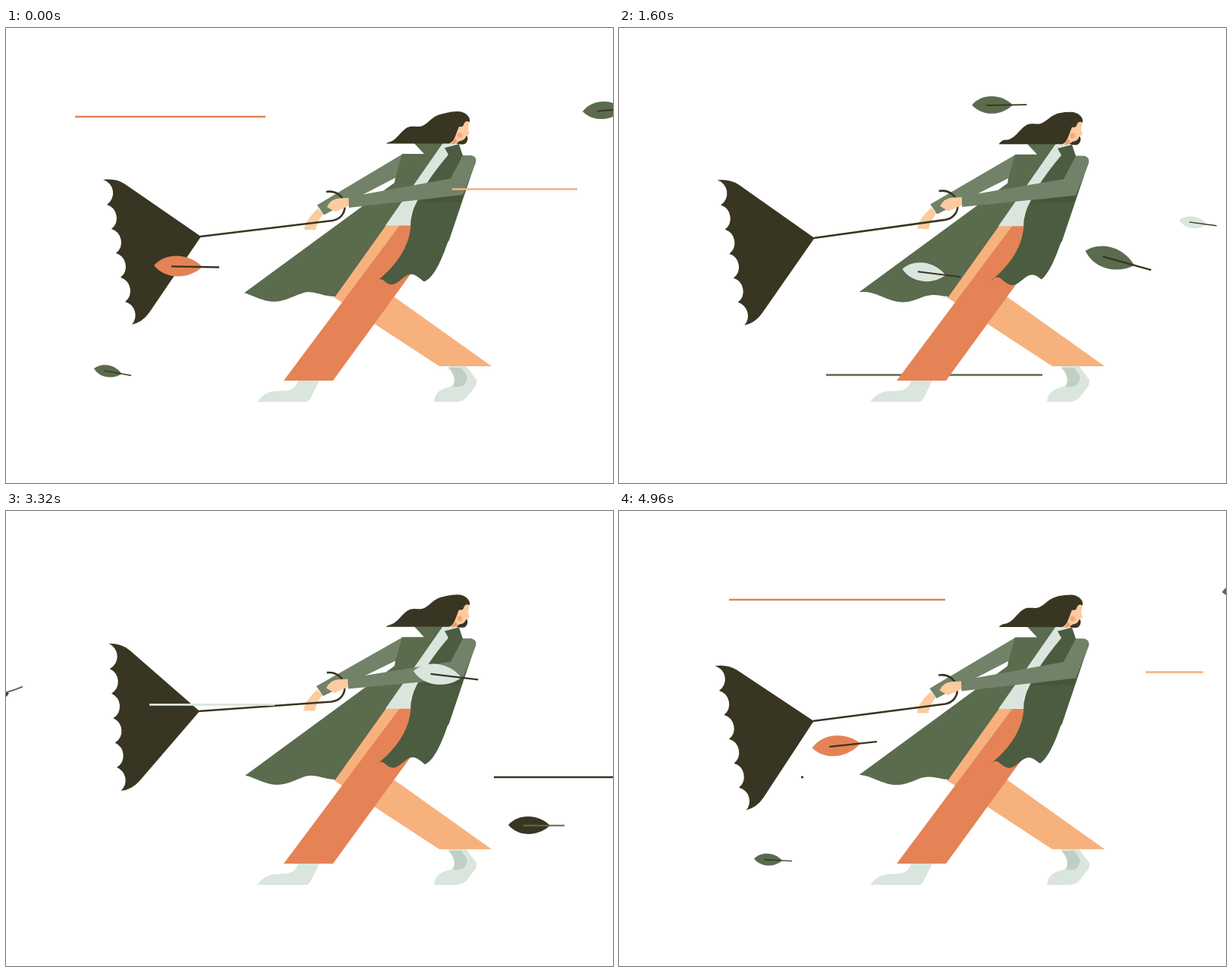
Animation, 800 px wide and 600 px high, one loop 5 s. Source, as an HTML page with a canvas:

```html
<!DOCTYPE html>
<html lang="en">
<head>
<meta charset="utf-8">
<title>Windy walk</title>
<style>
  html, body { margin: 0; width: 100%; height: 100%; overflow: hidden; background: #fff; }
  canvas { display: block; width: 800px; height: 600px; }
</style>
</head>
<body>
<canvas id="stage" width="800" height="600"></canvas>
<script>
const ctx = document.getElementById('stage').getContext('2d');
const LOOP = 5000, STEP = 40, TAU = Math.PI * 2;
const DARK = '#383622', GREEN = '#5a6b4e', DEEP = '#4c5c41', SLEEVE = '#718268';
const ORANGE = '#e58356', PEACH = '#f7b17d', SKIN = '#fccb9f', PALE = '#dae6dd';

const clamp = (v, lo, hi) => Math.min(hi, Math.max(lo, v));
const lerp = (a, b, u) => a + (b - a) * u;
const shape = (d, color) => { ctx.fillStyle = color; ctx.fill(new Path2D(d)); };
const stroke = (d, color, width) => {
  ctx.strokeStyle = color;
  ctx.lineWidth = width;
  ctx.stroke(new Path2D(d));
};
const turn = (deg, x, y) => {
  ctx.translate(x, y);
  ctx.rotate(deg * Math.PI / 180);
  ctx.translate(-x, -y);
};
const group = draw => { ctx.save(); draw(); ctx.restore(); };

// Wind rhythm: fast flutter of cloth, slower bob of the body
const flutter = t => t * 15 / LOOP;
const bobAt = t => -1.5 * Math.sin(TAU * t * 6 / LOOP);
const pull = t => (1 - Math.cos(TAU * (flutter(t) - 0.95))) / 2;

// Slow keyed sway with an optional flutter on top
const KEYS = [0, 1080, 2080, 2800, 3320, 4160, 4960, LOOP];
function sway(values, t, amp = 0) {
  let i = 0;
  while (i < KEYS.length - 2 && t >= KEYS[i + 1]) i++;
  const rest = k => values[k % values.length] - amp * pull(KEYS[k]);
  const u = (t - KEYS[i]) / (KEYS[i + 1] - KEYS[i]);
  return lerp(rest(i), rest(i + 1), (1 - Math.cos(Math.PI * u)) / 2) + amp * pull(t);
}

// Samples y = f(x) as path segments
function curve(from, to, f) {
  const step = from < to ? 1.5 : -1.5;
  let d = '';
  for (let x = from; (to - x) * step > 0; x += step) d += `L${x.toFixed(2)} ${f(x).toFixed(2)}`;
  return d + `L${to} ${f(to).toFixed(2)}`;
}

// Gusts: color, start, middle x, y, in front of the figure
const GUSTS = [
  [ORANGE, 4800, 287.5, 117, 0], [ORANGE, 1880, 287.5, 117, 0],
  [PEACH, 4920, 525.5, 212.5, 1], [DARK, 960, 580.5, 351, 0],
  [DARK, 3240, 580.5, 351, 0], [DARK, 4640, 490, 351, 0],
  [PALE, 1800, 417, 255.3, 1], [PALE, 3080, 416.5, 255.3, 1],
  [PALE, 4040, 495.5, 436, 1], [GREEN, 2640, 415.5, 457.5, 0],
  [PEACH, 4160, 505, 457.5, 0], [ORANGE, 2760, 621.5, 191.5, 0],
  [PALE, 640, 495.5, 436, 1], [GREEN, 1440, 415.5, 457.5, 0],
  [PEACH, 2200, 525.5, 212.5, 1], [DARK, 3700, 490, 351, 0],
  [ORANGE, 3440, 287.5, 117, 0]
];
const HEAD = [250, 168.5, 62.5, -54.5, -142.5, -196.5, -227.5, -244.5, -250];
function headAt(u) {
  const i = Math.min(7, Math.floor(u * 8));
  return lerp(HEAD[i], HEAD[i + 1], u * 8 - i);
}
function drawGusts(t, front) {
  for (const [color, start, mid, y, isFront] of GUSTS) {
    const u = (t - start + LOOP) % LOOP / 320;
    if (u > 1 || isFront !== front) continue;
    const left = mid + headAt(u);
    const right = Math.max(left + 3, mid - headAt(1 - u));
    stroke(`M${left} ${y}H${right}`, color, 2.7);
  }
}

// Leaves: color, front, then time, tip x, tip y, angle, scale, bend
const LEAVES = [
  [GREEN, 0, 0, 760, 110, -4, 0.85],
  [ORANGE, 1, 0, 195, 313, 1, 1],
  [GREEN, 0, 0, 116, 449, 10, 0.58],
  [GREEN, 1, 1080, 579, 98, 9, 0.84],
  [PALE, 0, 1080, 366, 225, -9, 1],
  [DARK, 0, 1080, 578, 443, 9, 0.84],
  [ORANGE, 1, 2080, 567, 99, 9, 0.84],
  [PALE, 0, 2080, 143, 369, 1, 0.58],
  [PALE, 0, 2080, 730, 453, 0, 0.66],
  [GREEN, 0, 2080, -58, 437, 0, 1.05],
  [GREEN, 1, 2800, 303, 107, -7, 0.84],
  [PEACH, 1, 2800, 572, 122, 9, 0.67],
  [DARK, 0, 2800, 662, 387, 30, 0.84, 9],
  [PALE, 1, 2800, 139, 343, 7, 1],
  [PALE, 1, 3320, 537, 211, 7, 1],
  [DARK, 0, 3320, 662, 414, 0, 0.86],
  [ORANGE, 0, 3320, 567, 118, 12, 0.5],
  [ORANGE, 1, 4160, 233, 179, 226, 1, 21],
  [PALE, 0, 4160, 518, 66, 4, 0.84],
  [PEACH, 1, 4160, 560, 321, 8, 0.58],
  [DARK, 0, 560, 400, 495, 2, 0.84],
  [PEACH, 1, 560, 450, 90, 4, 0.67],
  [PALE, 1, 1580, 400, 320, 4, 0.9],
  [GREEN, 0, 1580, 490, 100, -4, 0.84],
  [GREEN, 0, 3740, 425, 440, 2, 0.67]
];
// Each leaf enters at the right and speeds up along a long wave, rocking as it goes
const ENTRY = 850, SPEED = 30, ACCEL = 1.05;
const RISE = 100, PATH_WAVE = 0.003, ROCK = 0.36, ROCK_WAVE = 0.006;
function drawLeaves(t, front) {
  for (const [color, isFront, time, x0, y0, angle, size, bend = 0] of LEAVES) {
    if (isFront !== front) continue;
    const n0 = (Math.sqrt(SPEED ** 2 + 4 * ACCEL * (ENTRY - x0)) - SPEED) / (2 * ACCEL);
    const n = n0 + ((t - time + LOOP * 1.5) % LOOP - LOOP / 2) / STEP;
    if (n < 0 || n > 20) continue;
    const x = ENTRY - SPEED * n - ACCEL * n * n;
    const slope = Math.tan(clamp(angle, -15, 15) * Math.PI / 180);
    const path = Math.acos(slope / (RISE * PATH_WAVE));
    const y = y0 + RISE * (Math.sin(path + (x - x0) * PATH_WAVE) - Math.sin(path));
    const rock = Math.acos(slope / ROCK) + (x - x0) * ROCK_WAVE;
    const tilt = Math.atan(ROCK * Math.cos(rock)) - Math.atan(slope);
    const belly = bend * 0.75;
    group(() => {
      ctx.translate(x, y);
      ctx.rotate(angle * Math.PI / 180 + tilt);
      ctx.scale(size, size);
      shape(`M0 0C16 ${belly - 18} 46 ${belly - 17} 64 1C46 ${belly + 18} 16 ${belly + 19} 0 0Z`, color);
      stroke(`M23 ${1 + bend * 0.35}Q56 ${1 + bend * 0.2} 86 ${1 - bend}`,
        color === DARK ? GREEN : DARK, 2.3);
    });
  }
}

function drawLegs() {
  shape('M331 493Q340 480 354 479L372 478Q382 476 386 463H414L402 487Q399 493 396 493Z', PALE);
  shape('M581 444H605L620 464Q621 468 618 473L608 486Q603 493 593 493H564Q565 478 582 474L588 472Q596 462 581 444Z', PALE);
  shape('M583 448H600L607 458Q609 463 604 470Q601 474 589 473Q595 460 583 448Z', '#c0cfc4');
  shape('M506 252L432 355L571 446H640L480 332L540 252Z', PEACH);
  shape('M525 252L366 465H431L586 252Z', ORANGE);
}

function drawCoat(t) {
  const p = flutter(t);
  const edge = x => 350 - (x - 313) * 0.733;
  const back = x => 354 + clamp((434 - x) / 38, 0.15, 1) * 6.8 * Math.cos(TAU * ((x - 353) / 105 + p));
  let tip = 290;
  while (edge(tip) > back(tip)) tip += 0.25;
  shape(`M522 166H551L538 152H576L501 260L434 354${curve(432, tip, back)}L512 204L513 198Z`, GREEN);
  const lapel = 'L583 167Q566 187 553 207L541 230';
  shape(`M575 153L597 152L578 158${lapel}L534 245L533 260.5H500Z`, PALE);
  const wave = x => 331.5 + clamp((x - 490) / 12, 0, 1) * 6.8 * Math.cos(TAU * ((x - 508) / 52 + p));
  const side = x => 283 + 2.95 * (582 - x) - 0.0416 * (582 - x) ** 2;
  const hem = x => x > 550 ? Math.min(wave(x), side(x)) : wave(x);
  shape(`M541 230Q533.5 244 533.5 258C533 284 518 310 491 332${curve(491, 582, hem)}L584 280L619 176L613 168H602L597 153L578 158${lapel}Z`, DEEP);
  shape('M541 230L603 216L600 229Z', '#46543b');
}

function drawHead(t) {
  const p = flutter(t);
  const lock = x => {
    const amp = Math.min(1, (x - 500) / 8, (588 - x) / 38);
    const y = 152 - (x - 502) * 0.5 - amp * (3.4 + 3.8 * Math.cos(TAU * ((x - 529) / 42 + p)));
    return Math.min(152.5, y);
  };
  shape('M606 140Q611 146 606 152Q602 155 593 152L600 147Z', DARK);
  shape('M603 122H611L609 133L611 140L607 142Q604 149 598 149L592 153H584L592 136Z', SKIN);
  shape('M587 153L592 146L595 149L591 153Z', '#f0966a');
  ctx.beginPath();
  ctx.arc(598, 141.5, 3.5, 0, TAU);
  ctx.fillStyle = '#f7a87a';
  ctx.fill();
  shape(`M501 152.5${curve(501, 580, lock)}Q587 110 595 110Q603 110 608 115Q612 119 611 124Q605 121 603 128Q602 131 597 130L592 143Q589 151 584 152.5Z`, DARK);
}

function drawUmbrella(t, dx, dy) {
  const shaft = sway([6.9, 8.4, 7.5, 5.7, 4.1, 7.7, 7.4], t) - 6.9;
  const canopy = sway([11.25, 12.2, 9.2, 8.9, 4.7, 11, 12.2], t) - 11.25;
  group(() => {
    ctx.translate(dx, dy);
    turn(-shaft, 430, 254);
    stroke('M256 275L430 254C443 252 448 241 446 232C444 221 434 214 422 216', DARK, 2.6);
    turn(shaft - canopy, 256, 275);
    const ribs = [[133, 233], [139, 265], [145, 297], [151, 329], [157, 361], [166, 391]];
    const scallops = ribs.map(([x, y]) => `A18.5 18.5 0 0 1 ${x} ${y}`).join('');
    shape(`M257 275L157 206Q145 198 128 200${scallops}Q180 388 189 375Z`, DARK);
  });
}

function drawFigure(t) {
  const bob = bobAt(t);
  const dx = sway([0, 2, 1, 3, -1, 3, -0.5], t, 3);
  const dy = sway([0, 2.5, 2, 6.5, -2.5, 8, 0.5], t, 8);
  const at = (x, y) => `${x + dx} ${y + dy}`;
  const fixed = (x, y) => `${x} ${y + bob}`;
  const bobbing = draw => group(() => { ctx.translate(0, bob); draw(t); });

  drawLegs();
  group(() => {
    ctx.translate(dx, dy);
    shape('M411 238L418 245Q410 256 408 266H393Q394 254 411 238Z', SKIN);
  });
  shape(`M${fixed(523, 166)}L${at(410, 233.5)}L${at(419, 246.5)}L${fixed(514, 197)}Z`, SLEEVE);
  bobbing(drawCoat);
  drawUmbrella(t, dx, dy);
  group(() => {
    ctx.translate(dx, dy);
    shape('M453 224V234L434 242.5L423 236Q428 225 440 224.5Z', SKIN);
  });
  shape(`M${fixed(602, 168)}L${fixed(614, 168)}Q${fixed(621, 170)} ${fixed(619, 178)}L${fixed(602, 220)}L${at(452, 237)}L${at(451.5, 223)}L${fixed(586, 198.5)}Z`, SLEEVE);
  bobbing(drawHead);
}

function render() {
  const t = Math.floor((performance.now() + 8) / STEP) * STEP % LOOP;
  ctx.fillStyle = '#fff';
  ctx.fillRect(0, 0, 800, 600);
  drawGusts(t, 0);
  drawLeaves(t, 0);
  drawFigure(t);
  drawGusts(t, 1);
  drawLeaves(t, 1);
  requestAnimationFrame(render);
}
render();
</script>
</body>
</html>
```
